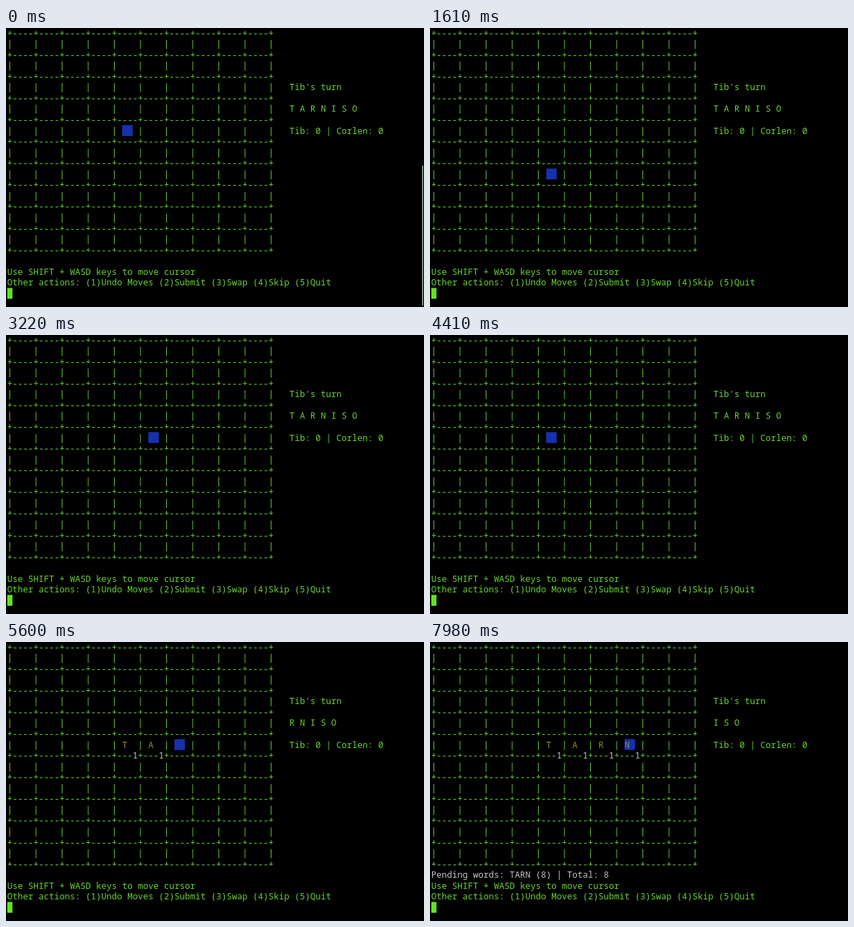
Animation, 600 px wide and 400 px high, one loop 8000 ms. Source, as an HTML page:

```html
<!DOCTYPE html>
<html lang="en">
<head>
<meta charset="utf-8">
<title>Word game in a terminal</title>
<style>
  html, body { margin: 0; width: 100%; height: 100%; overflow: hidden; background: #000; }
  svg { display: block; }
  text {
    font: 300 12.5px "Noto Sans Mono", "DejaVu Sans Mono", monospace;
    white-space: pre;
    fill: #68d42c;
  }
  .tile { fill: #928b30; }
  .plain { fill: #c4c4c4; }
</style>
</head>
<body>
<svg id="stage" width="600" height="400" viewBox="0 0 600 400"></svg>
<script>
const LOOP = 8000;
const CHAR = 7.5, LINE = 15.56, LEFT = 1.8, BASE = 11.5;
const CELLS = 10, WORD_ROW = 4;
const FADE_START = 70, FADE_END = 350;
const RACK = [...'TARNISO'];
const WORD = 'TARN';

// [start ms, cursor column, cursor row, tiles placed]
const STEPS = [
  [0, 4, 4, 0],
  [980, 4, 5, 0],
  [1330, 4, 6, 0],
  [1820, 5, 6, 0],
  [2170, 6, 6, 0],
  [2800, 6, 5, 0],
  [3010, 6, 4, 0],
  [3150, 5, 4, 0],
  [3430, 4, 4, 0],
  [4760, 4, 4, 1],
  [5040, 5, 4, 1],
  [5320, 5, 4, 2],
  [5530, 6, 4, 2],
  [5880, 6, 4, 3],
  [6090, 7, 4, 3],
  [6300, 7, 4, 4],
];

const stage = document.getElementById('stage');
const colX = col => LEFT + col * CHAR;
const rowY = row => 7 + (row - 0.5) * LINE;

function add(tag, attrs, parent = stage) {
  const el = document.createElementNS('http://www.w3.org/2000/svg', tag);
  for (const key in attrs) el.setAttribute(key, attrs[key]);
  return parent.appendChild(el);
}

function print(col, row, str, cls = '', parent = stage) {
  const el = add('text', { x: colX(col), y: BASE + row * LINE, class: cls }, parent);
  el.textContent = str;
  return el;
}

function block(col, row, width, fill, parent = stage) {
  return add('rect', {
    x: colX(col), y: rowY(row), width: width * CHAR, height: LINE, fill
  }, parent);
}

const show = (el, on) => el.setAttribute('visibility', on ? 'visible' : 'hidden');

const pointer = block(0, 0, 2, '#1631ae');

for (let row = 0; row <= 2 * CELLS; row++) {
  const [edge, fill] = row % 2 ? ['|', '    '] : ['+', '----'];
  print(0, row, (edge + fill).repeat(CELLS) + edge);
}

const tiles = [...WORD].map((letter, i) => {
  const group = add('g', {});
  const col = (4 + i) * 5, row = WORD_ROW * 2 + 1;
  print(col + 2, row, letter, 'tile', group);
  block(col + 4, row + 1, 1, '#000', group);
  print(col + 4, row + 1, '1', 'plain', group);
  return group;
});

print(54, 5, "Tib's turn");
const rack = print(54, 7, '');
print(54, 9, 'Tib: 0 | Corlen: 0');

const pending = print(0, 21, `Pending words: ${WORD} (8) | Total: 8`, 'plain');
print(0, 22, 'Use SHIFT + WASD keys to move cursor');
print(0, 23, 'Other actions: (1)Undo Moves (2)Submit (3)Swap (4)Skip (5)Quit');
block(0, 24, 1, '#62e41e');

const scrollbar = add('rect', {
  x: 597, y: 197, width: 2, height: 201, rx: 1, fill: '#7f8c78'
});

function scrollbarOpacity(time) {
  if (time <= FADE_START) return 1;
  if (time >= FADE_END) return 0;
  return (FADE_END - time) / (FADE_END - FADE_START);
}

function draw(time) {
  const [, col, row, placed] = STEPS.findLast(step => step[0] <= time);
  pointer.setAttribute('x', colX(col * 5 + 2));
  pointer.setAttribute('y', rowY(row * 2 + 1));
  tiles.forEach((tile, i) => show(tile, i < placed));
  rack.textContent = RACK.slice(placed).join(' ');
  show(pending, placed === WORD.length);
  scrollbar.setAttribute('opacity', scrollbarOpacity(time));
}

const start = performance.now();
function tick() {
  draw((performance.now() - start) % LOOP);
  requestAnimationFrame(tick);
}
tick();
</script>
</body>
</html>
```
